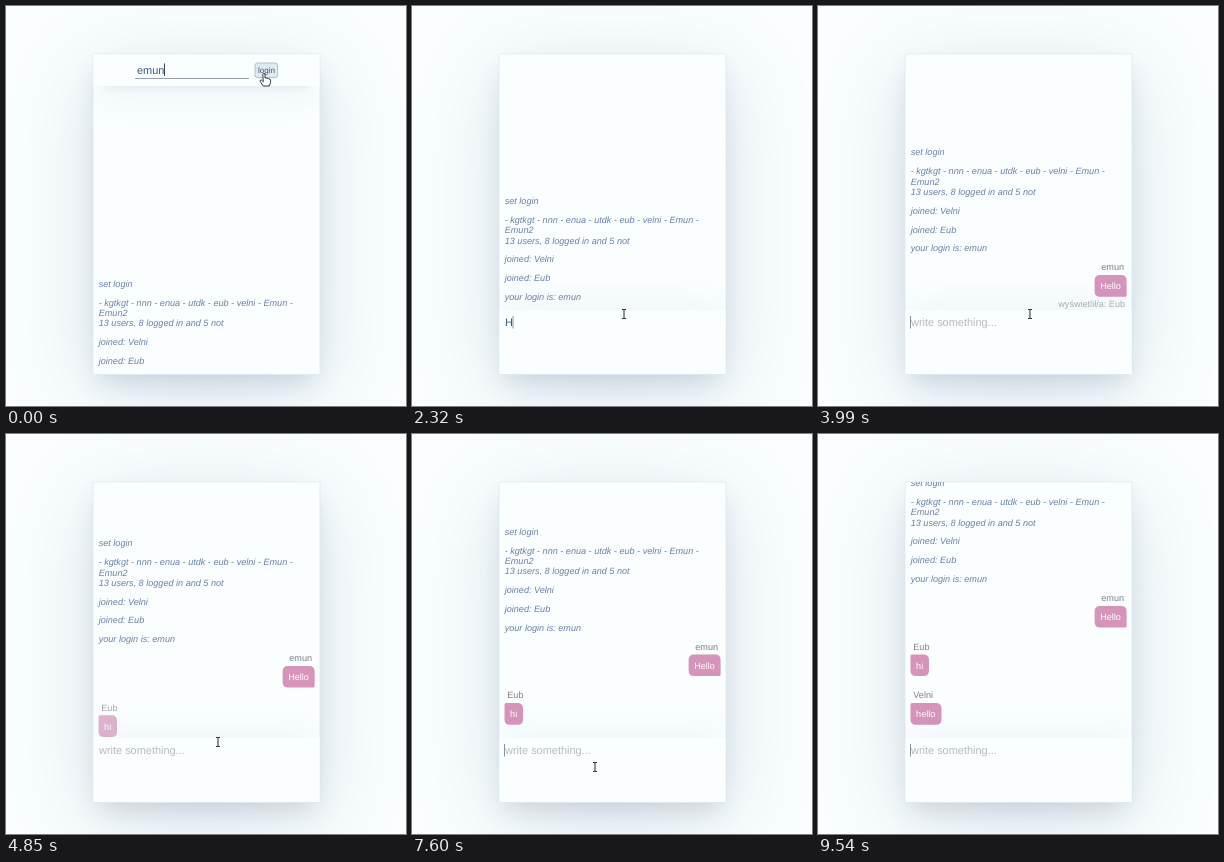
These frames come from a looping animation (400x400 px, 9.67 s). An HTML page:

```html
<!DOCTYPE html>
<html lang="en">
<head>
<meta charset="utf-8">
<title>Chat login</title>
<style>
  html, body { margin: 0; width: 100%; height: 100%; overflow: hidden; background: #fafeff; }
  svg { display: block; width: 100vw; height: 100vh; }
  text { font: 9.1px "Liberation Sans", Arial, sans-serif; text-rendering: geometricPrecision; white-space: pre; }
  .info { font-style: italic; fill: #6982a3; }
  .name { fill: #7f8086; }
  .said { fill: #fff; }
  .seen { fill: #adafb4; text-anchor: end; }
  .field { font-size: 10.95px; fill: #3a5b80; }
  .hint { fill: #b6babf; }
  .shade { fill: #54728f; }
</style>
</head>
<body>
<svg viewBox="0 0 400 400">
  <defs>
    <clipPath id="cardClip"><rect x="87" y="48" width="227.5" height="320.5"/></clipPath>
  </defs>

  <rect width="400" height="400" fill="#fafeff"/>
  <rect class="shade" x="87" y="67" width="227" height="320" opacity=".2" style="filter:blur(44px)"/>
  <rect class="shade" x="93" y="66" width="215" height="308" opacity=".23" style="filter:blur(13px)"/>
  <rect x="87" y="48" width="227" height="320.5" rx="1" fill="#fafeff" stroke="#dfe9f1" stroke-width=".8"/>

  <g clip-path="url(#cardClip)">
    <g id="list"></g>

    <g id="header">
      <rect class="shade" x="92" y="52" width="217" height="42" opacity=".06" style="filter:blur(16px)"/>
      <rect class="shade" x="99" y="58" width="203" height="24" opacity=".1" style="filter:blur(3px)"/>
      <rect x="87.4" y="48.4" width="226.2" height="31.6" fill="#fbfeff"/>
      <text class="field" x="131" y="67.6">emun</text>
      <rect id="loginCaret" x="158" y="57.5" width="1" height="12.5" fill="#3c4650"/>
      <rect x="129" y="72" width="114" height="1" fill="#98a2ad"/>
      <rect x="249" y="57" width="22.6" height="14.6" rx="2.5" fill="#dfe9f1" stroke="#a5bbcc" stroke-width=".9"/>
      <text x="252" y="67.2" style="font-size:8px" fill="#45566a">login</text>
    </g>

    <g id="strip">
      <rect class="shade" x="92" y="-4" width="217" height="68" opacity=".07" style="filter:blur(16px)"/>
      <rect x="87.4" y="0" width="226.2" height="64" fill="#fbfeff"/>
      <text id="hint" class="hint"></text>
      <text id="typed" class="field" x="93" y="16"></text>
      <rect id="caret" x="92" y="6" width="1" height="12.5" fill="#8b939a"/>
    </g>
  </g>

  <g id="cursor" stroke-linejoin="round" stroke-linecap="round">
    <path id="arrow" d="M0 0V9.6L2.3 7.5L4 11.2L5.6 10.5L4 7H7Z" fill="#fff" stroke="#20252b" stroke-width=".9"/>
    <path id="beam" d="M-1.6 -4.5H-.4L0 -4L.4 -4.5H1.6M0 -4V4M-1.6 4.5H-.4L0 4L.4 4.5H1.6" fill="none" stroke="#20252b" stroke-width="1"/>
    <path id="hand" d="M-1 1Q0 -.6 1 1V5Q2.2 4.2 2.9 5.4Q4.2 4.7 4.8 6Q6.4 5.6 6.6 7.2V9.4L5.2 13H-.8L-4 8.2Q-4 6.4 -2.4 7.2L-1 8.5Z" fill="#fff" stroke="#20252b" stroke-width=".9"/>
  </g>
</svg>

<script>
const LOOP = 9670;
const SCROLL = 800;
const STEP = 48.6;
const FIRST_Y = 280.5;   // baseline of the first line before login
const STRIP_Y = 304;
const CARD_BOTTOM = 368;

const $ = id => document.getElementById(id);

function add(parent, tag, attrs, label) {
  const el = document.createElementNS("http://www.w3.org/2000/svg", tag);
  for (const key in attrs) el.setAttribute(key, attrs[key]);
  if (label) el.textContent = label;
  parent.appendChild(el);
  return el;
}

const clamp = u => Math.min(1, Math.max(0, u));
const ramp = (t, start, length) => clamp((t - start) / length);
const mix = (a, b, u) => a + (b - a) * u;

// cubic-bezier(.25, .1, .25, 1)
function ease(u) {
  if (u <= 0 || u >= 1) return clamp(u);
  const curve = (s, a, b) => 3 * (1 - s) ** 2 * s * a + 3 * (1 - s) * s * s * b + s ** 3;
  let lo = 0, hi = 1;
  for (let i = 0; i < 24; i++) {
    const mid = (lo + hi) / 2;
    if (curve(mid, .25, .25) < u) lo = mid; else hi = mid;
  }
  return curve(lo, .1, 1);
}
const eased = (t, start, length) => ease(ramp(t, start, length));

const show = (el, on) => el.setAttribute("visibility", on ? "visible" : "hidden");
const move = (el, x, y) => el.setAttribute("transform", `translate(${x.toFixed(2)} ${y.toFixed(2)})`);

// Chat log, laid out relative to the first baseline
const list = $("list");
const info = (parent, y, label) => add(parent, "text", { class: "info", x: 92.7, y }, label);

info(list, 0, "set login");
info(list, 19, "- kgtkgt - nnn - enua - utdk - eub - velni - Emun -");
info(list, 29.3, "Emun2");
info(list, 39.5, "13 users, 8 logged in and 5 not");
info(list, 58.3, "joined: Velni");
info(list, 77.2, "joined: Eub");

// Rounded box with one tight corner on the speaker's side
function bubble(x, y, w, h, mine) {
  const r = 5.5, tight = 1.5;
  const tl = mine ? r : tight, br = mine ? tight : r;
  return `M${x + tl} ${y}h${w - tl - r}q${r} 0 ${r} ${r}v${h - r - br}q0 ${br} ${-br} ${br}` +
    `h${br + r - w}q${-r} 0 ${-r} ${-r}v${tl + r - h}q0 ${-tl} ${tl} ${-tl}z`;
}

function message(index, name, said, width, mine) {
  const g = add(list, "g", {});
  const top = 115 + STEP * index;
  const x = mine ? 308.6 - width : 92.5;
  add(g, "text", { class: "name", x: mine ? 306 : 95.3, y: top, "text-anchor": mine ? "end" : "start" }, name);
  add(g, "path", { d: bubble(x, top + 4.7, width, 21.6, mine), fill: "#d694bb" });
  add(g, "text", { class: "said", x: x + 5.6, y: top + 18.9 }, said);
  return g;
}

const welcome = add(list, "g", {});
info(welcome, 96, "your login is: emun");

const entries = [
  { el: welcome, fade: 1130 },
  { el: message(0, "emun", "Hello", 32, true), scroll: 3082, fade: 3150 },
  { el: message(1, "Eub", "hi", 18.5, false), scroll: 4480, fade: 4520 },
  { el: message(2, "Velni", "hello", 31, false), scroll: 7798, fade: 7830 }
];
const seen = add(list, "text", { class: "seen", x: 307, y: 151.8 }, "wyświetlił/a: Eub");

const keys = [[2320, "H"], [2470, "He"], [2620, "Hel"], [2770, "Hell"], [2900, "Hello"], [3080, ""]];
const blinks = [1870, 2220, 2320, 3560, 3990, 4420, 4900, 5410, 5840, 6300,
  6750, 7200, 7600, 8070, 8500, 9010, 9540];

// Pointer: time, x, y
const path = [
  [0, 258, 67], [960, 258, 67], [1370, 218, 198], [1730, 212, 308],
  [4850, 212, 308], [5250, 209.5, 302], [5850, 209.5, 302], [6390, 183, 333],
  [9000, 183, 333], [9100, 206, 242], [9230, 300, 290], [9340, 336, 402]
];

function drawCursor(t) {
  let i = 0;
  while (i < path.length - 2 && t >= path[i + 1][0]) i++;
  const [t0, x0, y0] = path[i], [t1, x1, y1] = path[i + 1];
  const u = ramp(t, t0, t1 - t0);
  const x = mix(x0, x1, u), y = mix(y0, y1, u);
  const hand = t < 1000;
  const beam = t >= 1780 && y > 303.5 && y < CARD_BOTTOM && x < 309;
  move($("cursor"), x, y);
  show($("hand"), hand);
  show($("beam"), beam);
  show($("arrow"), !hand && !beam && t < 9340);
}

function drawStrip(t, open) {
  move($("strip"), 0, mix(CARD_BOTTOM, STRIP_Y, open));
  show($("strip"), open > 0);

  let typed = "";
  for (const [at, label] of keys) if (t >= at) typed = label;
  const focus = ramp(t, 1750, 120);
  const hint = $("hint");
  hint.textContent = focus > 0 ? "write something..." : "write something";
  hint.style.fontSize = mix(9.1, 10.95, focus) + "px";
  hint.setAttribute("x", mix(91.5, 93, focus));
  hint.setAttribute("y", mix(13.2, 16, focus));
  show(hint, open > 0 && !typed);

  $("typed").textContent = typed;
  const end = typed ? $("typed").getComputedTextLength() + .6 : 0;
  $("caret").setAttribute("x", 92 + end);
  show($("caret"), blinks.filter(at => t >= at).length % 2 === 1);
}

function draw(t) {
  const open = eased(t, 890, 900);
  let y = FIRST_Y - 82.5 * eased(t, 890, SCROLL);

  for (const { el, scroll, fade } of entries) {
    if (scroll) y -= STEP * eased(t, scroll, SCROLL);
    const shown = eased(t, fade, SCROLL);
    el.setAttribute("opacity", shown);
    move(el, 0, 2.5 * (1 - shown));
  }
  move(list, 0, y);
  seen.setAttribute("opacity", ramp(t, 3740, 240) * (1 - ramp(t, 4420, 180)));

  move($("header"), 0, -16 * open);
  $("header").setAttribute("opacity", 1 - open);
  show($("loginCaret"), t < 380 || (t >= 810 && t < 890));

  drawStrip(t, open);
  drawCursor(t);
}

const start = performance.now();
function tick() {
  draw((performance.now() - start) % LOOP);
  requestAnimationFrame(tick);
}
tick();
</script>
</body>
</html>
```
